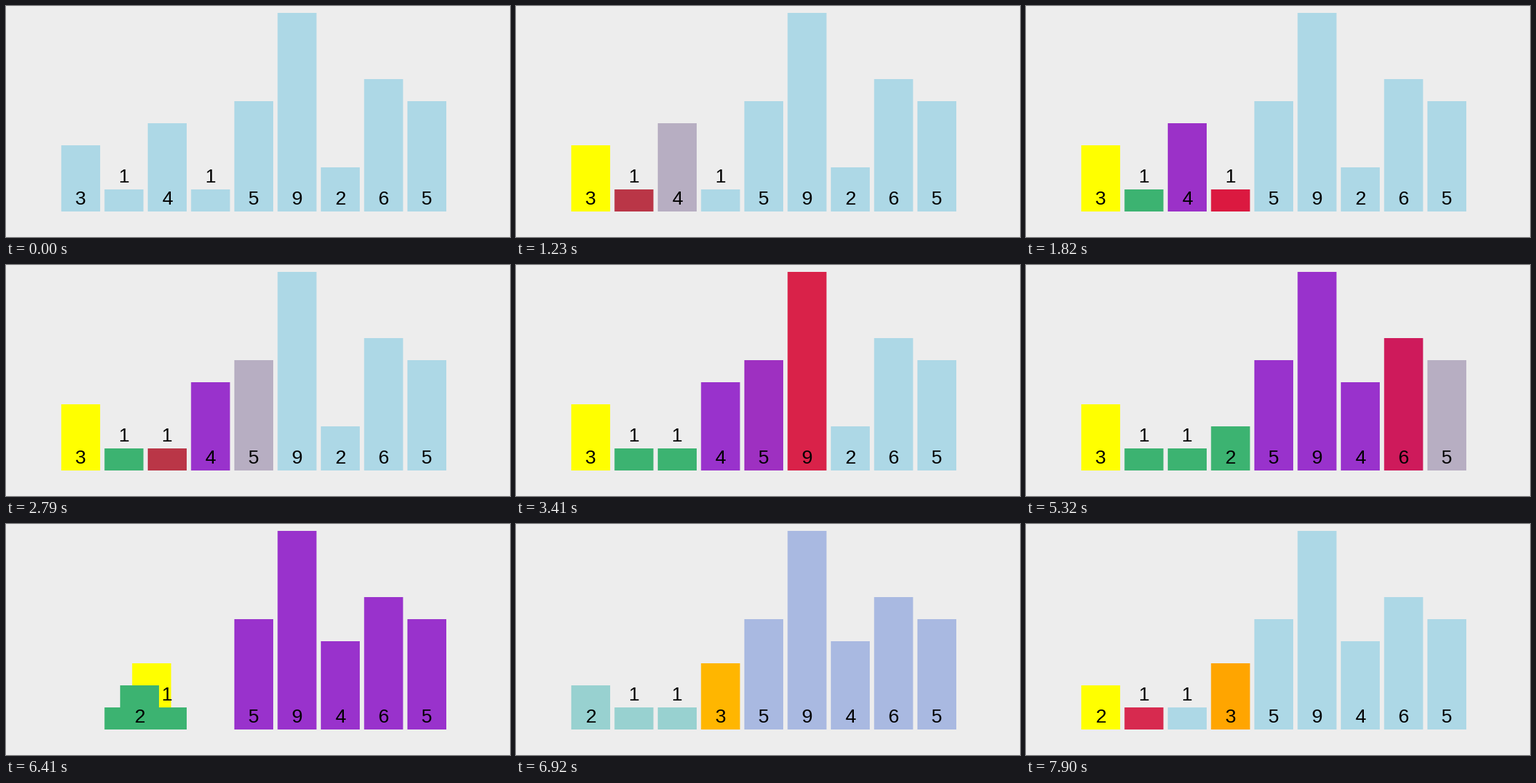
A matplotlib script for the animation above (8000 ms loop, 728 px wide and 335 px high).

```python
import numpy as np
import matplotlib.pyplot as plt
from matplotlib.animation import FuncAnimation
from matplotlib.colors import to_rgb
from matplotlib.patches import Rectangle

W, H, DPI = 728, 335, 100
LOOP, STEP = 8000, 20                 # ms
VALUES = [3, 1, 4, 1, 5, 9, 2, 6, 5]
LEFT, PITCH, BAR_W, BASE, UNIT = 79.8, 62.5, 56.2, 298, 32
EASE_MS, TICK = 250, 33

IDLE, PIVOT, SCAN = "lightblue", "yellow", "crimson"
LESS, MORE, DONE = "mediumseagreen", "darkorchid", "orange"

# (start, end, {bar: colour}) recolours bars; (start, end, (a, b)) swaps them
EVENTS = [
    (260, 360, {0: PIVOT}),
    (750, 840, {1: SCAN}),
    (1230, 1340, {1: LESS, 2: SCAN}),
    (1710, 1820, {2: MORE, 3: SCAN}),
    (2130, 2350, (2, 3)),
    (2760, 2950, {3: LESS, 4: SCAN}),
    (3320, 3410, {4: MORE, 5: SCAN}),
    (3790, 3880, {5: MORE, 6: SCAN}),
    (4210, 4410, (2, 6)),
    (4750, 4910, {6: LESS, 7: SCAN}),
    (5320, 5430, {7: MORE, 8: SCAN}),
    (5800, 6000, {8: MORE}),
    (6310, 6520, (0, 6)),
    (6860, 6970, {i: DONE if i == 0 else IDLE for i in range(9)}),
    (7340, 7450, {6: PIVOT}),
    (7820, 7900, {1: SCAN}),
]


def cubic_in_out(u):
    u = min(max(u, 0), 1)
    return 4 * u**3 if u < 0.5 else 1 - 4 * (1 - u)**3


def progress(t, start, end, lead):
    """Eased progress, advancing in ticks and resting once the end is reached."""
    shown = end if t >= end else start + TICK * ((t - start) // TICK)
    return cubic_in_out((shown - start + lead) / EASE_MS)


def state(t):
    slots = np.arange(len(VALUES), dtype=float)
    colors = np.array([to_rgb(IDLE)] * len(VALUES))
    active = [e for e in EVENTS if e[0] <= t]
    for event in active:
        start, end, change = event
        swap = isinstance(change, tuple)
        p = 1
        if event is active[-1]:
            p = progress(t, start, end, 30 if swap else 94)
        if swap:
            a, b = change
            shift = (slots[b] - slots[a]) * p
            slots[a] += shift
            slots[b] -= shift
        else:
            for i, name in change.items():
                colors[i] += (np.array(to_rgb(name)) - colors[i]) * p
    return slots, colors


fig = plt.figure(figsize=(W / DPI, H / DPI), dpi=DPI, facecolor="#ededed")
ax = fig.add_axes([0, 0, 1, 1])
ax.set(xlim=(0, W), ylim=(H, 0))
ax.axis("off")

bars, labels = [], []
for i, v in enumerate(VALUES):
    bar = Rectangle((0, BASE - v * UNIT), BAR_W, v * UNIT, lw=0,
                    snap=False, zorder=2 * i + 1)
    bars.append(ax.add_patch(bar))
    baseline = BASE - 10 - (UNIT if v == 1 else 0)
    labels.append(ax.text(0, baseline, str(v), family="Liberation Sans",
                          size=28 * 72 / DPI, color="black", ha="center",
                          va="baseline", zorder=2 * i + 2))


def draw(n):
    slots, colors = state(n * STEP + STEP / 2)
    for bar, label, slot, color in zip(bars, labels, slots, colors):
        x = LEFT + PITCH * slot
        bar.set_x(x)
        bar.set_facecolor(color)
        label.set_x(x + BAR_W / 2)
    return bars + labels


anim = FuncAnimation(fig, draw, frames=LOOP // STEP, interval=STEP,
                     repeat=True, repeat_delay=0, blit=False)
plt.show()
```
